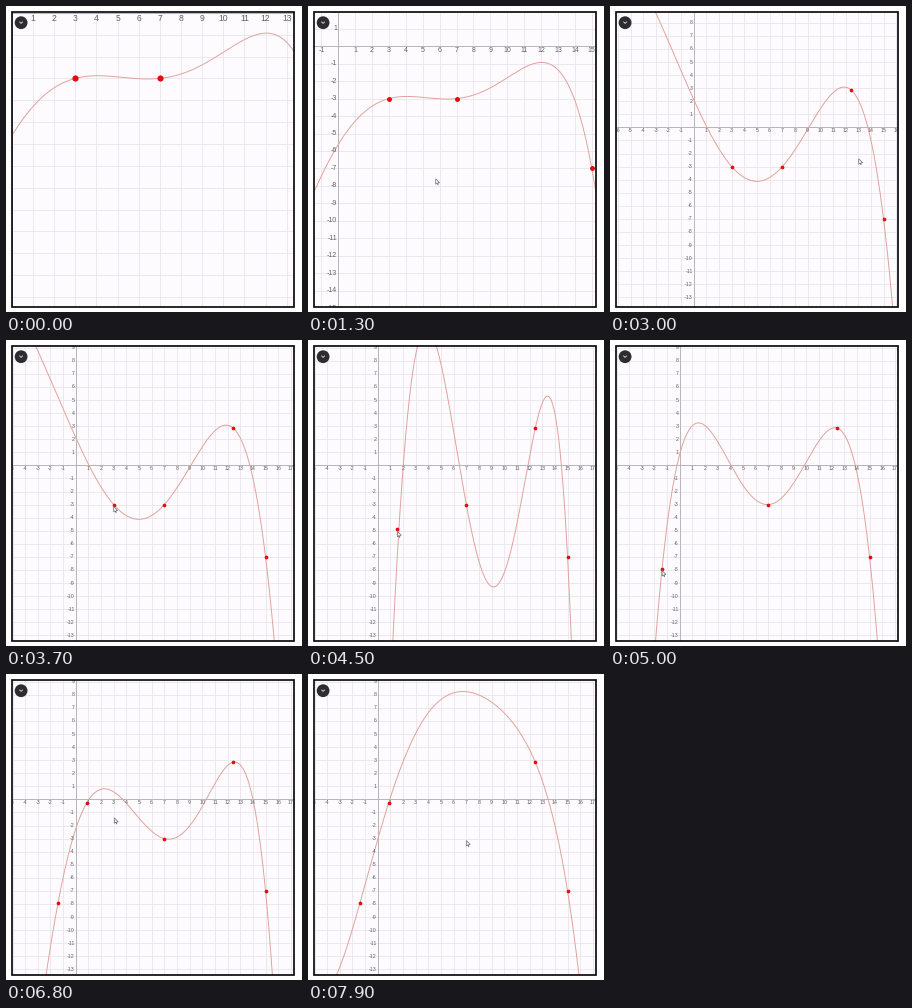
Write a matplotlib script that moves like this. It is 296 by 306 pixels and loops after 8000 ms.

```python
import numpy as np
import matplotlib.pyplot as plt
from matplotlib.animation import FuncAnimation
from matplotlib.collections import LineCollection
from matplotlib.patches import Circle, Polygon, Rectangle

W, H, DPI = 296, 306, 100
FRAMES, STEP = 80, 100
PX = 72 / DPI                          # points per pixel
UNIT = np.array([12.65, -13.07])       # pixels per unit at zoom 1
ZOOM = 1.673                           # zoom at the start
LEFT, RIGHT, TOP, BOTTOM = 5.8, 288.3, 6.4, 300.9
NX, NY = range(-7, 19), range(-15, 10)

# Data points
P3, P7, P12, P15 = (3, -3), (7, -3), (12.45, 2.85), (15, -7)
MID, LOW, NEW = (1.55, -4.9), (-1.4, -7.9), (0.85, -0.3)

# Times of events
ADD_12, GRAB, TURN, DROP = 2600, 3800, 4500, 5000
RELAX, SETTLED, ADD_NEW, REMOVE_7 = 5100, 6000, 6100, 7800

# Screen positions of the pointer and the two pans
CORNER, HOVER = np.array([6, 7]), np.array([128, 173])
PAN_1, PAN_2 = np.array([29, 47.8]), np.array([-14, 4])


def ramp(t, start, end):
    return np.clip((t - start) / (end - start), 0, 1)


def lerp(a, b, u):
    return np.asarray(a) * (1 - u) + np.asarray(b) * u


def fit(*pts):
    x, y = np.array(pts, float).T
    return np.polyfit(x, y, len(pts) - 1)


def through(*pts):
    return fit(P7, P12, P15, *pts)


START = fit(P3, P7, P15, (0, -5.63), (12, -0.93), (-3.8, -13.6))
ADDED = through(P3, (5, -4.13), (-3, 8.76))
STEEP = through((MID[0], -6.8), (9.15, -9.3), (4.65, 9.06))
HUMPS = through(LOW, (1.45, 3.25), (4.05, 0))
SHELF = through(LOW, (-5.06, 2.2), (5, -3.65))
ARCH = fit(LOW, NEW, P12, P15, (6.6, 8.25), (-3.2, -13.3))

# Lift the shelf to the new point, keeping the other four
bump = np.poly([p[0] for p in (LOW, P7, P12, P15)])
BENT = np.polyadd(SHELF, bump * (NEW[1] - np.polyval(SHELF, NEW[0]))
                  / np.polyval(bump, NEW[0]))


def morph(a, b, xa, xb, u):
    """Move the free node and two far supports; the fixed points stay."""
    start = np.array([xa, -10.9, 24])
    end = np.array([xb, -10.9, 24])
    x = lerp(start, end, u)
    y = lerp(np.polyval(a, start), np.polyval(b, end), u)
    return through(*zip(x, y))


def curve_at(t):
    if t <= ADD_12:
        return START
    if t < TURN:
        return morph(ADDED, STEEP, P3[0], MID[0], ramp(t, GRAB, TURN))
    if t < RELAX:
        return morph(STEEP, HUMPS, MID[0], LOW[0], ramp(t, TURN, DROP))
    if t <= ADD_NEW:
        return morph(HUMPS, SHELF, LOW[0], LOW[0], ramp(t, RELAX, SETTLED))
    return BENT if t < REMOVE_7 else ARCH


def grabbed(t):
    return lerp(lerp(P3, MID, ramp(t, GRAB, TURN)), LOW, ramp(t, TURN, DROP))


def view(t):
    """Zoom out around the pointer, then pan twice."""
    zoom = lerp(ZOOM, 1, ramp(t, 1100, 1500))
    origin = lerp(HOVER, CORNER, zoom / ZOOM)
    origin = origin + PAN_1 * ramp(t, 1600, 1800) + PAN_2 * ramp(t, 3100, 3400)
    return origin, zoom


def to_screen(pts, t):
    origin, zoom = view(t)
    return origin + np.asarray(pts) * UNIT * zoom


def pointer_at(t):
    rest = np.array([249, 153])
    pos = lerp((46, 133), HOVER, ramp(t, 800, 1000))
    pos = pos + PAN_1 * ramp(t, 1600, 1800)
    for start, end, goal in (
            (1900, 2200, (200, 131)),
            (2200, ADD_12, to_screen(P12, ADD_12)),
            (2700, 3000, rest),
            (3100, 3400, rest + PAN_2),
            (3400, 3700, to_screen(grabbed(t), t)),
            (RELAX, SETTLED, to_screen(NEW, t)),
            (6300, 7700, to_screen(P7, t))):
        pos = lerp(pos, goal, ramp(t, start, end))
    return pos + (0, 2 * ramp(t, 3400, 3700))


def dots_at(t):
    shown = [(grabbed(t), True), (P15, True), (P7, t < REMOVE_7),
             (P12, t >= ADD_12), (NEW, t >= ADD_NEW)]
    return to_screen([p for p, on in shown if on], t)


fig = plt.figure(figsize=(W / DPI, H / DPI), dpi=DPI, facecolor="white")
ax = fig.add_axes([0, 0, 1, 1])
ax.set_xlim(0.3, W + 0.3)
ax.set_ylim(H + 0.2, 0.2)
ax.axis("off")

box = Rectangle((LEFT, TOP), RIGHT - LEFT, BOTTOM - TOP, fc="#fdfbfe", ec="none")
ax.add_patch(box)


def inside(artist):
    artist.set_clip_path(box)
    return artist


grid = LineCollection([], colors="#e9e7ec", linewidths=0.9 * PX, zorder=2)
axes_lines = LineCollection([], colors="#b2b2b6", linewidths=0.9 * PX, zorder=3)
for lines in (grid, axes_lines):
    ax.add_collection(lines, autolim=False)
    inside(lines)

curve, = ax.plot([], [], color="#e0a09b", lw=0.95 * PX, zorder=4)
marks, = ax.plot([], [], "o", color="#e30b12", mew=0, zorder=6)
inside(curve)
inside(marks)


def label(n, ha):
    return inside(ax.text(0, 0, str(n), family="Liberation Sans",
                          color="#626266", ha=ha, va="center", zorder=5,
                          clip_on=True))


x_labels = {n: label(n, "center") for n in NX if n}
y_labels = {n: label(n, "right") for n in NY if n}

ax.add_patch(Rectangle((LEFT, TOP), RIGHT - LEFT, BOTTOM - TOP, fill=False,
                       ec="#08080a", lw=1.7 * PX, zorder=10))
ax.add_patch(Circle((15.4, 16.9), 6.4, fc="#2d2d31", ec="none", zorder=8))
ax.plot([14, 15.4, 16.8], [16.2, 17.6, 16.2], color="#d8d8dc",
        lw=0.9 * PX, zorder=9)

ARROW = np.array([(0, 0), (0, 5.4), (1.3, 4.3), (2.4, 6.3), (2.4, 4), (3.9, 3.9)])
pointer = Polygon(ARROW, closed=True, fc="white", ec="#77777c",
                  lw=0.8 * PX, zorder=7)
ax.add_patch(pointer)


def column(x):
    return [(x, TOP), (x, BOTTOM)]


def row(y):
    return [(LEFT, y), (RIGHT, y)]


def draw(i):
    t = i * STEP
    (ox, oy), zoom = view(t)
    sx, sy = UNIT * zoom

    grid.set_segments([column(ox + n * sx) for n in NX]
                      + [row(oy + n * sy) for n in NY])
    axes_lines.set_segments([column(ox), row(oy)])

    for n, txt in x_labels.items():
        txt.set_position((ox + n * sx, oy + 3.5 * zoom))
    for n, txt in y_labels.items():
        txt.set_position((ox - 0.9 * zoom, oy + n * sy))
    for txt in (*x_labels.values(), *y_labels.values()):
        txt.set_fontsize(5.2 * zoom * PX)

    px = np.linspace(LEFT, RIGHT, 700)
    py = oy + sy * np.polyval(curve_at(t), (px - ox) / sx)
    curve.set_data(px, np.clip(py, -H, 2 * H))

    marks.set_data(*dots_at(t).T)
    marks.set_markersize(3.7 * zoom * PX)

    pointer.set_visible(t >= 800)
    pointer.set_xy(ARROW + pointer_at(t))
    return []


anim = FuncAnimation(fig, draw, frames=FRAMES, interval=STEP, repeat=True,
                     repeat_delay=0)
plt.show()
```
